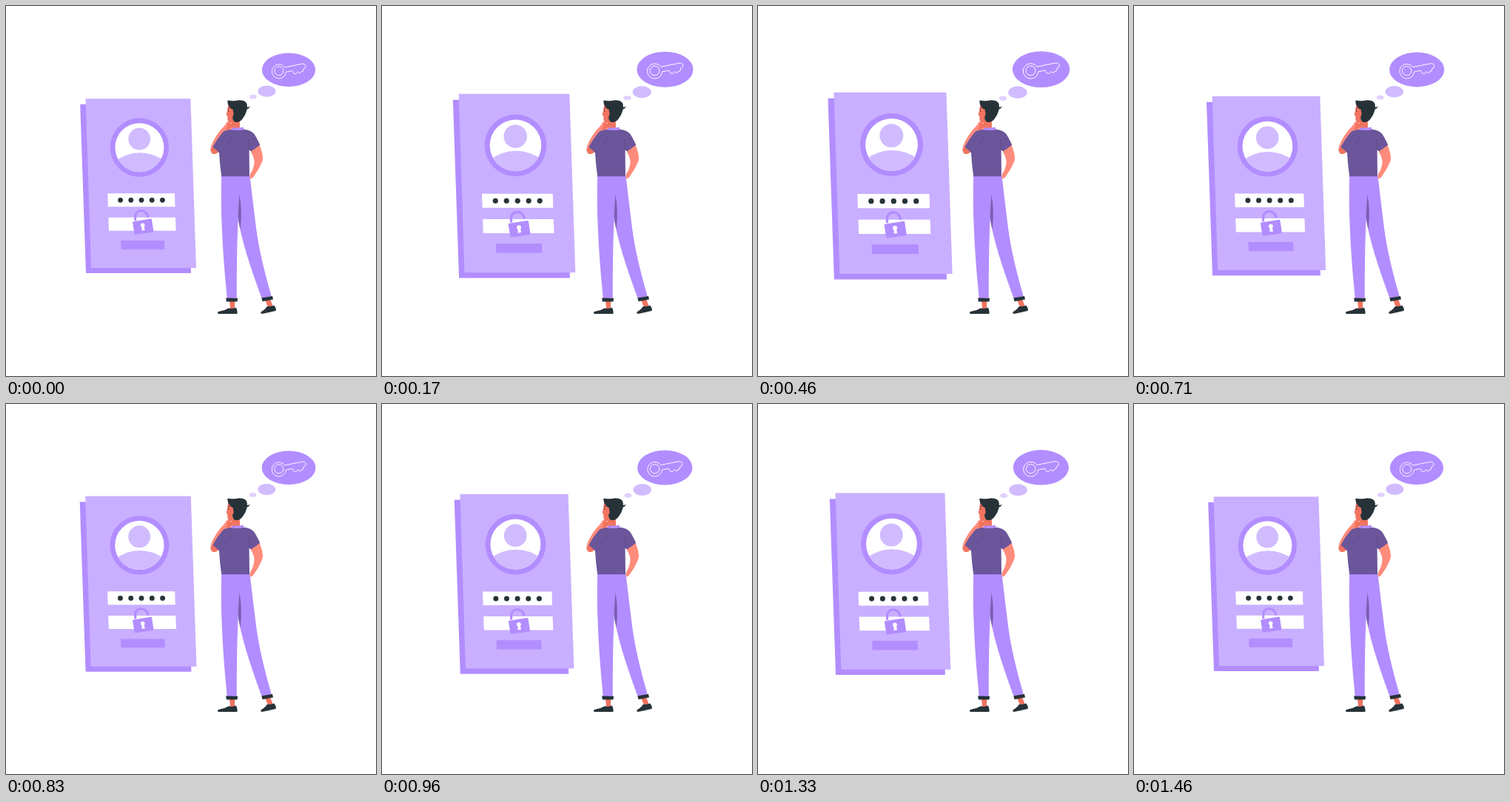
Animation, 500 px wide and 500 px high, one loop 1.54 s. Source, as an HTML page:

```html
<!DOCTYPE html>
<html lang="en">
<head>
<meta charset="utf-8">
<title>Forgotten password</title>
<style>
  html, body { margin: 0; width: 100%; height: 100%; overflow: hidden; background: #fff; }
  svg { display: block; width: 100vw; height: 100vh; }
  .main { fill: #b28dff; }
  .light { fill: #c9afff; }
  .pale { fill: #d1bbff; }
  .dark { fill: #263238; }
  .white { fill: #fff; }
  .skin { fill: #ff8b7b; }
  .tan { fill: #f0735f; }
  .shirt { fill: #6b559b; }
  .line { fill: none; stroke: #fff; stroke-width: .9; stroke-linejoin: round; }
</style>
</head>
<body>
<svg viewBox="0 0 500 500">
  <defs>
    <clipPath id="face"><circle cx="180.4" cy="191.2" r="33"/></clipPath>
  </defs>

  <g id="panel">
    <path class="main" d="M100.2 132.8H242L250 361H108Z"/>
    <path class="light" d="M107.6 125.3H249.4L257 354H115Z"/>
    <circle class="main" cx="180.4" cy="191.2" r="39.7"/>
    <circle class="white" cx="180.4" cy="191.2" r="33"/>
    <circle class="pale" cx="180.2" cy="179.7" r="14.9"/>
    <path class="pale" clip-path="url(#face)" d="M145 212Q161 198.2 181 198.2T217 212V230H145Z"/>
    <path class="white" d="M137.3 253.3H228L228.5 271.2H137.9ZM138.4 285.7H229L229.7 303.7H139Z"/>
    <g id="dots" class="dark"></g>
    <path class="main" d="M155.2 317H214L214.5 328.8H155.7Z"/>
    <path d="M174.7 290V285.5C174 273.5 190.5 273.5 191.8 285.6" fill="none" stroke="#b28dff" stroke-width="3.1"/>
    <path class="main" d="M172.3 291.2L195.4 287.6Q196.8 287.4 197 288.8L199.3 304Q199.5 305.4 198.1 305.6L175.2 308.8Q173.8 309 173.6 307.6L171.2 292.8Q171 291.4 172.3 291.2Z"/>
    <circle class="white" cx="184.7" cy="296.2" r="2.8"/>
    <path class="white" d="M183.8 297L186.2 296.8L187.8 302.8L183.2 303.4Z"/>
  </g>

  <g id="bubble">
    <ellipse class="main" cx="382" cy="86.2" rx="36.1" ry="22.8"/>
    <ellipse class="pale" cx="352.4" cy="115.2" rx="11.9" ry="7.6"/>
    <ellipse cx="333.8" cy="122.7" rx="4.9" ry="2.9" fill="#e0d1ff"/>
    <circle class="line" cx="368.8" cy="87.8" r="6"/>
    <path class="line" d="M376.6 82.9L400 78.2Q404.6 77.8 405 81.2Q405 84.2 402.2 84.6L401.4 88.2L399 88.6L397.6 91L394.4 88.8L392.2 91.6L389.2 91.2L387 87.4L378.3 89.2A9.5 9.5 0 1 1 376.6 82.9Z"/>
  </g>

  <g id="man">
    <path class="tan" d="M302.2 399H309.2L309 409.5H303ZM350.4 398L357.2 396.5L360.4 405L354.5 408Z"/>
    <path class="dark" d="M286 414Q286.5 412.6 290 412.2Q296.5 411 301 408.2Q306 409.6 310.5 407.6Q313 410.5 312.5 416H287Q285.8 415.6 286 414Z"/>
    <path class="dark" d="M344.2 414.6Q344.5 413 347.5 411.5Q351 409 353 405.8Q358 406.6 362.2 404.6Q365 407.5 365 411.8Q356 414.2 346 416Q344.2 416 344.2 414.6Z"/>
    <path class="main" d="M291.2 230H329.6Q334 268 338.3 302Q343 338 358.8 392.5L345.8 395.5Q318.5 322 313.8 287Q311.6 330 311.8 395.5H298.8Q289 298 291.2 230Z"/>
    <path d="M315.4 255Q319.5 273 316.8 302Q313.4 290 313.7 280Z" fill="#7b5fb3"/>
    <path class="dark" d="M297.2 394.6L313.1 395L312.6 399.6L297.9 399.4ZM345.3 394.5L360 391.9L361 396.4L346.6 399.2Z"/>

    <path class="skin" d="M333 192L342.6 188Q347.4 199 347 207.5Q343.5 218 336 228.5Q333 234 329.4 233.2L329.8 227.5Q334.3 221 335.3 213Q336.8 207 330.5 196Z"/>
    <path class="tan" d="M305 150H315.6L316.2 167H305Z"/>
    <path class="tan" d="M300.2 134Q299.3 139 298.8 142.5L297.6 147.5L299.3 148.6Q299 156.5 301.5 158.5Q305 159.2 309 155.5V137Z"/>
    <path class="skin" d="M300.5 155.5Q298 157 295.5 161.5Q283 174 277.3 189Q275.2 196 278.4 199Q282.5 201.8 287.5 197L300 171Q305 167 307.3 160.5L303.5 159.8Z"/>
    <path class="tan" d="M276.6 193Q276.4 198 279 199.4Q283 201.3 288 196.5L283 189Z"/>
    <path class="shirt" d="M306 166.6Q313 168.2 322 166.8Q331 168 335 172.5Q338 176.5 343.3 187.8L331.2 196.5L328.6 194.5L329 230.3H291.2Q288.7 213 288 198L279.3 190.5Q285.5 179 294 169.6Q299 167.2 306 166.6Z"/>
    <path d="M305.8 176Q301 186 288.4 198M328.6 180V195" fill="none" stroke="#5c4788" stroke-width=".6"/>
    <path class="main" d="M306.4 164.2Q314 165.2 320.8 163.8L321.6 167.2Q313 168.4 304.2 167.4Z"/>
    <path class="tan" d="M299.4 158.5Q301.8 156.8 307.4 160.5Q306 164 302.4 165.8L298.2 168.5Z"/>
    <path class="dark" d="M299.4 127.6Q307 128.8 314 127.4Q324.5 126.8 325.8 133.5V136.4Q328.2 137.2 329.5 135.2Q329.2 138.8 325.6 139.4Q325 145 319.2 153Q314.5 158.6 309 156.4Q306.2 155 306.2 149.5L307 140Q304.5 140.2 302.5 137Q299 133.5 299.4 127.6Z"/>
    <path class="tan" d="M307.6 143.2Q305 142 304.7 145Q304.9 148.5 307.2 149Z"/>
    <path d="M299.8 138.8L302.3 138.2M300.6 141V142.8" fill="none" stroke="#263238" stroke-width=".8"/>
  </g>
</svg>
<script>
  const LOOP = 1540, FPS = 24, LAST = 35;
  // Two heartbeats: [step, scale]
  const beats = [[0, 1], [7.2, 1.1], [20.8, 1], [27.9, 1.1], [35, 1]];
  const panel = document.getElementById('panel');
  const bubble = document.getElementById('bubble');

  document.getElementById('dots').innerHTML = [0, 1, 2, 3, 4]
    .map(i => `<circle cx="${154.6 + i * 14.2}" cy="262.3" r="3.4"/>`).join('');

  function beat(step) {
    const i = Math.max(1, beats.findIndex(b => b[0] >= step));
    const [a, from] = beats[i - 1], [b, to] = beats[i];
    return from + (to - from) * (step - a) / (b - a);
  }

  function zoom(el, x, y, s) {
    el.setAttribute('transform', `translate(${x} ${y}) scale(${s}) translate(${-x} ${-y})`);
  }

  function draw(ms) {
    const step = Math.min(LAST, Math.floor((ms % LOOP + 5) * FPS / 1000));
    const s = beat(step);
    zoom(panel, 178.6, 243.2, s);
    zoom(bubble, 373.5, 94.5, s);
  }

  let start;
  function tick(now) {
    start ??= now;
    draw(now - start);
    requestAnimationFrame(tick);
  }
  draw(0);
  requestAnimationFrame(tick);
</script>
</body>
</html>
```
